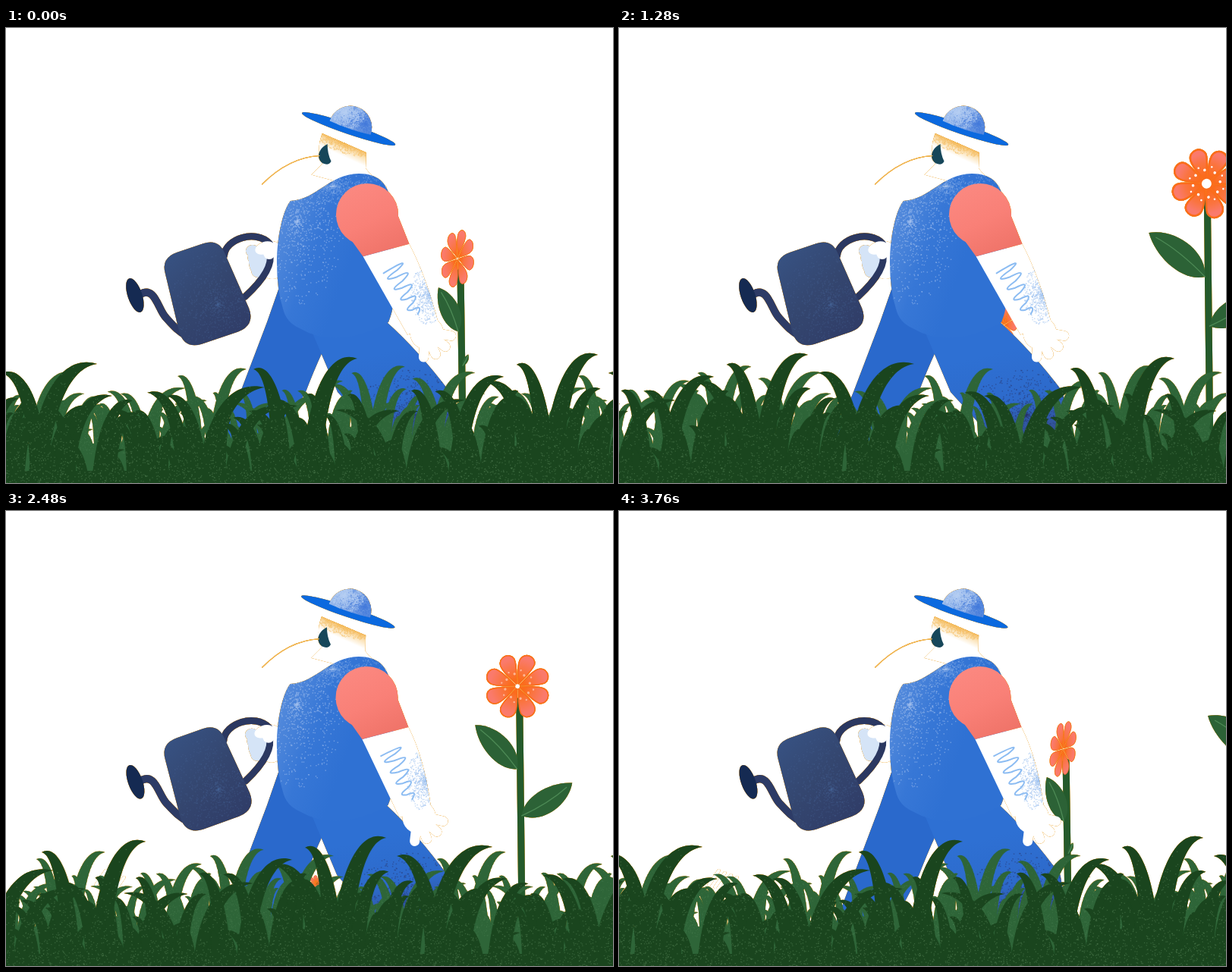
Write an HTML page with a canvas that moves like this. It is 800x600 px and loops after 3.84 s.

```html
<!DOCTYPE html>
<html lang="en">
<head>
<meta charset="utf-8">
<title>Gardener</title>
<style>
  html, body { margin: 0; width: 100%; height: 100%; overflow: hidden; background: #fff; }
  canvas {
    display: block; width: 800px; height: 600px;
    filter: drop-shadow(0 0 .6px #e99a18) drop-shadow(0 0 .4px #efb04a);
  }
</style>
</head>
<body>
<canvas id="stage" width="800" height="600"></canvas>
<script>
const LOOP = 3840, STEP = 80, CYCLE = 1280, TAU = 2 * Math.PI, RAD = Math.PI / 180;
const g = document.getElementById('stage').getContext('2d');

const clamp = (v, lo = 0, hi = 1) => Math.min(hi, Math.max(lo, v));
const ease = u => u * u * (3 - 2 * u);

function random(seed) {
  return () => (seed = (seed * 16807) % 2147483647) / 2147483647;
}

// Rocks between -1 and 1, lingering at both ends.
const swing = (phase, lag) => Math.sin(Math.PI / 2 * Math.cos(phase - lag * RAD));

function fill(path, color) {
  g.fillStyle = color;
  g.fill(path);
}

function line(path, color, width) {
  g.strokeStyle = color;
  g.lineWidth = width;
  g.lineCap = g.lineJoin = 'round';
  g.stroke(path);
}

function oval(x, y, rx, ry, color, turn = 0) {
  g.beginPath();
  g.ellipse(x, y, rx, ry, turn, 0, TAU);
  g.fillStyle = color;
  g.fill();
}

function fade(x0, y0, x1, y1, ...colors) {
  const f = g.createLinearGradient(x0, y0, x1, y1);
  colors.forEach((c, i) => f.addColorStop(i / (colors.length - 1), c));
  return f;
}

const rnd = random(77);
const DOTS = Array.from({ length: 900 }, () => {
  const a = rnd() * TAU, r = rnd();
  return [r * Math.cos(a), r * Math.sin(a)];
});

// Grain inside a shape, densest at its middle.
function grain(path, x, y, rx, ry, color) {
  g.save();
  g.clip(path);
  g.fillStyle = color;
  for (const [u, v] of DOTS) g.fillRect(x + u * rx, y + v * ry, 1.4, 1.4);
  g.restore();
}

function leaf(x, y, dx, dy) {
  const at = (u, v) => `${x + dx * u - dy * v} ${y + dy * u + dx * v}`;
  fill(new Path2D(`M${x} ${y}C${at(.2, .3)} ${at(.75, .28)} ${at(1, 0)}C${at(.7, -.22)} ${at(.2, -.25)} ${x} ${y}Z`), '#2c6236');
  line(new Path2D(`M${x} ${y}Q${at(.5, .07)} ${at(.88, .01)}`), '#4d8a55', 1.3);
}

// Height, size and opening follow from how far the flower has travelled.
function flower(x) {
  const rise = at => 18 * Math.log(1 + Math.exp((at - x) / 18));
  const y = 205 + rise(697), r = 50 * (1 - Math.exp(-Math.max(8, x - 380) / 150));
  const open = Math.max(.06, Math.abs(Math.sin(clamp((x - 555) / 70, -Math.PI / 2, Math.PI / 2))));
  const left = clamp((x - 545) / 180), right = ease(clamp((x - 590) / 100));
  const ripe = clamp((x - 640) / 75);

  line(new Path2D(`M${x + 5} 600Q${x + 3} 480 ${x + 1} ${y + r * .45}`), '#245a2c', 9);
  leaf(x - 2, 328 + .9 * rise(678), -6 - 68 * left, -58);
  leaf(x + 4, 393 + .65 * rise(678), 6 + 64 * right, -14 - 31 * right);

  g.save();
  g.translate(x - 3 * (1 - ripe), y);
  g.rotate((1 - open) * .25);
  g.scale(open * r / 47, r / 47);
  g.rotate((-63 - .4 * (x - 663)) * RAD);
  const tint = g.createRadialGradient(0, 0, 10, 0, 0, 40);
  tint.addColorStop(0, '#fb6c1c');
  tint.addColorStop(.3 + .3 * ripe, '#fa7440');
  tint.addColorStop(1, '#fa7a6c');
  for (let i = 0; i < 8; i++) {
    const petal = new Path2D('M3 0C14-4 24-11 36-11C50-10 50 9 38 11C27 11 14 4 3 0Z');
    fill(petal, tint);
    line(petal, '#fb6c1c', 1 + 1.5 * ripe);
    g.globalAlpha = ripe;
    oval(18, 3, 1.8, 1.8, '#fff');
    oval(23, -4, 1.3, 1.3, '#fff');
    g.globalAlpha = 1;
    g.rotate(TAU / 8);
  }
  oval(0, 0, 6.5 * ripe, 6.5 * ripe, '#fff');
  g.restore();
}

function can(c) {
  g.save();
  g.translate(266.5 - 4 * c, 373 - 24.5 * c);
  g.rotate((-28.5 + 10 * c) * RAD);
  const body = new Path2D('M-18-62H18Q40-62 41-40L48 38Q49 62 24 63H-26Q-50 62-49 38L-42-40Q-41-62-18-62Z');
  line(new Path2D('M-82-25C-60-30-66 0-60 14S-50 38-40 48'), '#2d3b66', 10);
  oval(-89, -26, 9.5, 23.5, '#152a52');
  line(new Path2D('M39-38C48-59 90-58 101-34M97-23Q97 0 48 22'), '#2b3861', 9);
  fill(body, fade(-30, -60, 30, 62, '#375181', '#34466f', '#303d68'));
  grain(body, 10, 20, 60, 70, 'rgba(70,100,150,.3)');
  g.restore();
}

function farHand(c) {
  const x = 336 + 8 * c, y = 296.5 - 6.5 * c;
  oval(x + 7, y + 16, 17, 25, '#fff');
  for (let i = 0; i < 4; i++) oval(x - 19 + i * 2.5, y + 4 + i * 9, 9, 8, '#d5e4f7');
  oval(x - 11, y + 17, 13, 20, '#d5e4f7');
  can(c);
  oval(x - 3, y, 13, 8, '#fff', -.35);
  oval(x + 3, y + 6, 8, 9, '#fff');
}

function head(k) {
  const x = 423.7 + 27.9 * k, y = 135.2 - 5.5 * k + 3.3 * k * k, turn = (8.1 + 10.7 * k) * RAD;
  g.save();
  g.translate(x, y);
  g.rotate(turn);
  const face = new Path2D('M-31 17L32 22L38 42Q48 50 72 56L70 100L0 95L4 71L-27 73L-18 55Q-32 40-31 17Z');
  fill(face, fade(0, 16, -2, 36, '#f2ae45', '#fbe2b6', '#fff'));
  grain(face, 0, 18, 42, 14, 'rgba(246,190,96,.5)');
  fill(new Path2D('M-20 28C-29 37-29 50-18 54Q-9 55-8 48Q-16 40-20 28Z'), '#17475a');
  oval(0, 0, 65, 9.2 - 2.3 * k, '#0b69df');
  const crown = new Path2D('M-27-2A28.5 29 0 1 1 30-2Q2 1-27-2Z');
  fill(crown, fade(-18, -30, 28, -4, '#9dbcec', '#7fa6e5', '#578ade'));
  grain(crown, 18, -14, 34, 26, 'rgba(70,125,220,.5)');
  grain(crown, -12, -20, 26, 24, 'rgba(180,205,242,.6)');
  g.restore();

  const c = Math.cos(turn), s = Math.sin(turn);
  const nx = x - 25 * c - 46 * s, ny = y - 25 * s + 46 * c;
  line(new Path2D(`M${nx} ${ny}Q${nx - 40} ${ny + 2} ${336 + 1.5 * k} ${220 - 14 * k}`), '#f2bd62', 1.1);
}

function leg(color, start, hip, knee, foot, end) {
  const [hl, hr] = hip, [kl, kr] = knee, [fl, fr] = foot;
  const shape = new Path2D(`M${start}L${hl} 388L${kl} 480L${fl} 545H${fr}L${kr} 480
    Q${(hr + kr) / 2} 425 ${hr} 388L${end}Z`);
  fill(shape, color);
  return shape;
}

const span = (mid, half) => [mid - half, mid + half];

function legs(k) {
  const kk = k * k, end = `${480 + 4 * k} 345`;
  leg('#2a69cc', `${356 + 3 * k} 345`, [368 - 48 * k + 24 * kk, 462 - 25 * k],
    span(402 - 89 * k + 39 * kk, 43), span(420 - 100 * k, 38), end);
  const knee = 441 + 70 * k;
  const near = leg(fade(knee, 425, knee + 30, 555, '#2e70d3', '#2d6acb', '#34467f'), `${386 + 18 * k} 370`,
    [380 + 18 * k, 490 + 12 * k], span(knee, 52 + 22 * clamp(k) ** 2), span(444 + 102 * k, 50), end);
  grain(near, knee + 25, 510, 75, 60, 'rgba(42,55,110,.5)');
}

function torso(k) {
  const x = 366 + 9 * k, y = 232 - 4 * k, n = 456 + 9 * k, b = 353.5 + 3.5 * k;
  const l = 366 + 3 * k, w = 492 + 4 * k + 8 * k * k;
  const shape = new Path2D(`M${x} ${y}C${x + 35} ${y - 2} ${n - 40} 193 ${n} 192
    C${n + 50} 192 511 240 511 310C511 345 ${w + 10} 365 ${w} 388
    Q${(l + w) / 2} 425 ${l + 18} 396Q${l} 388 ${l - 4} 370
    Q${b} 345 ${b} 310C${b} 275 ${x - 10} 240 ${x} ${y}Z`);
  fill(shape, fade(x - 15, 270, x + 80, 305, '#5289db', '#3777d6', '#2f71d3'));
  grain(shape, x + 8, 255, 62, 110, 'rgba(165,194,238,.55)');
  grain(shape, n - 35, 208, 75, 24, 'rgba(165,194,238,.3)');
}

function arm(k, c, phase) {
  const s = 460 + 16 * k, cx = 464 + 37 * k, cy = 295 - 2 * k, tilt = (-3 - 12 * k) * RAD;
  const wx = 465 + 85 * c, wy = 401 - 6 * c * c;
  const tx = 31.5 * Math.cos(tilt), ty = 31.5 * Math.sin(tilt);
  const len = Math.hypot(wx - cx, wy - cy), ux = (wx - cx) / len, uy = (wy - cy) / len;
  const up = Math.atan2(cx - s, cy - 246);
  // A point t along the forearm and v across it.
  const at = (t, v) => [cx + ux * t + uy * v, cy + uy * t - ux * v];

  const a = (52 + 50 * clamp(-Math.sin(phase)) ** 3) * RAD;
  const reach = (d, b) => `${wx + d * Math.cos(b)} ${wy + d * Math.sin(b)}`;
  for (let i = -1.5; i < 2; i++) {
    line(new Path2D(`M${reach(6, a)}L${reach(39, a + i * 24 * RAD)}`), '#fff', 13);
  }
  oval(wx + 9 * Math.cos(a), wy + 9 * Math.sin(a), 22, 22, '#fff');

  const fore = new Path2D(`M${cx - tx} ${cy - ty}L${at(len, -22)}L${at(len, 22)}
    Q${cx + tx + 45 * Math.sin(up)} ${cy + ty + 45 * Math.cos(up)} ${cx + tx} ${cy + ty}Z`);
  fill(fore, '#fff');
  grain(fore, ...at(76, 28), 26, 42, 'rgba(160,195,240,.6)');

  let scribble = `M${at(26, -16)}`;
  for (let i = 0; i < 9; i++) {
    const side = i % 2 ? -1 : 1, wide = 30 - 2 * i;
    scribble += `Q${at(24 + 8 * i - 3 * side, side * wide)} ${at(30 + 8 * i, side * 2)}`;
  }
  line(new Path2D(scribble), '#8cbcf2', 2);

  const pink = fade(s - 20, 210, s + 25, 300, '#fb8880', '#f98077', '#ef7368');
  fill(new Path2D(`M${s - 38} 256L${cx - tx} ${cy - ty}L${cx + tx} ${cy + ty}L${s + 38} 241Z`), pink);
  oval(s, 246, 41, 41, pink);
}

function water(ms) {
  if (ms < 900 || ms > 1260) return;
  const d = ms - 960;
  for (let i = 0; i < 4; i++) {
    line(new Path2D(`M${158 - d * .11 + i * 8} ${450 + d * .1 + i * 3}l-13 19`), '#fff', 4);
  }
}

// Tall blades of the repeating strip: root x, tip x, tip y.
const TALL = [[42, 120, 443], [45, -6, 455], [265, 341, 474], [365, 326, 450], [402, 463, 436],
  [594, 656, 460], [690, 631, 467], [712, 673, 444], [720, 780, 431]];

// An 800 px wide strip whose top lies at stage height 420.
function strip(color, speck) {
  const c = document.createElement('canvas');
  c.width = 800;
  c.height = 260;
  const q = c.getContext('2d'), r = random(4242);
  q.translate(0, -420);
  q.fillStyle = color;
  const blade = (x, tx, ty) => {
    const dx = tx - x, h = 600 - ty, w = 8 + h * .11, s = Math.sign(dx) * w;
    for (const o of [-800, 0, 800]) {
      const X = x + o, T = tx + o;
      q.beginPath();
      q.moveTo(X - s / 2, 610);
      q.bezierCurveTo(X - s * .4, ty + h * .35, X + dx * .35, ty - h * .1, T, ty);
      q.bezierCurveTo(X + dx * .5 + s * .1, ty - h * .1 + w * .8, X + s * .6, ty + h * .4, X + s / 2, 610);
      q.fill();
    }
  };
  TALL.forEach(b => blade(...b));
  const sprout = (count, top, depth, reach) => {
    for (let i = 0; i < count; i++) {
      const x = (i + r()) * 800 / count, side = r() < .5 ? -1 : 1;
      blade(x, x + side * reach * (.5 + r()), top + r() * depth);
    }
  };
  sprout(26, 472, 36, 46);
  sprout(60, 500, 60, 28);
  q.fillRect(0, 584, 800, 110);
  q.globalCompositeOperation = 'source-atop';
  q.fillStyle = speck;
  for (let i = 0; i < 4200; i++) q.fillRect(r() * 800, 440 + 165 * Math.sqrt(r()), 1.2, 1.2);
  return c;
}

const FRONT = strip('#1a451e', 'rgba(92,140,92,.45)');
const BACK = strip('#2e6538', 'rgba(90,145,95,.4)');

function grass(img, x, y, scale) {
  const w = 800 * scale;
  for (x = x % w - w; x < 800; x += w) g.drawImage(img, x, y, w, 260 * scale);
}

function draw(t) {
  const phase = t / CYCLE * TAU, body = swing(phase, 10), trail = swing(phase, 25);
  const walked = .1378 * t;
  g.clearRect(0, 0, 800, 600);
  for (let x = (598 + walked) % 264 + 264; x < 856; x += 264) flower(x);
  water(t % CYCLE);
  farHand(trail);
  head(body);
  legs(body);
  torso(body);
  arm(body, trail, phase);
  grass(BACK, 11 + walked, 439.5, .66);
  grass(FRONT, .2101 * t, 420, 1);
}

const start = performance.now();
let shown = -1;
function tick() {
  const t = Math.floor((performance.now() - start) % LOOP / STEP) * STEP;
  if (t !== shown) draw(shown = t);
  requestAnimationFrame(tick);
}
tick();
</script>
</body>
</html>
```
